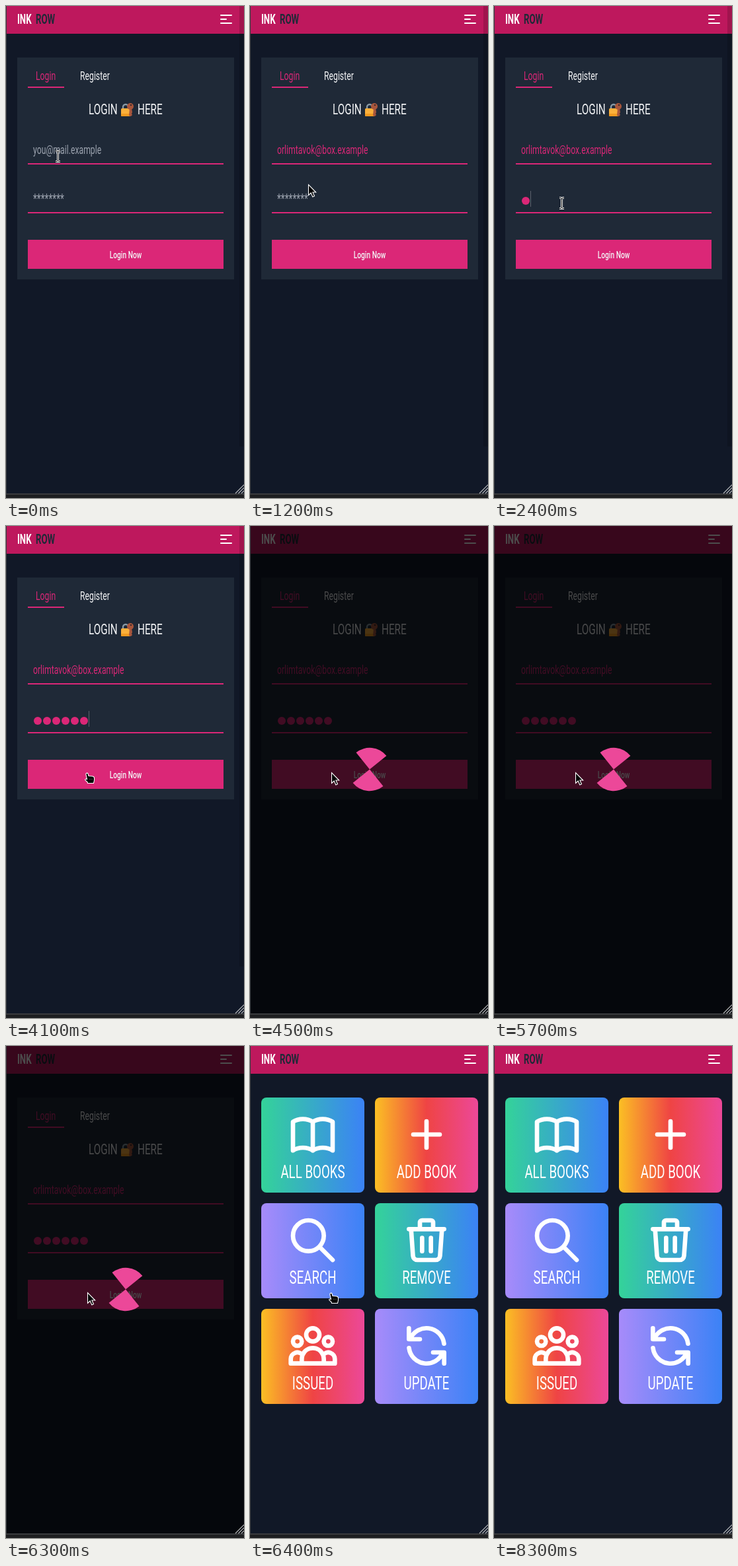
An HTML page that plays this animation: 360 by 745 pixels, repeating every 8.5 s.

```html
<!DOCTYPE html>
<html lang="en">
<head>
<meta charset="utf-8">
<title>Library login</title>
<style>
  html, body { margin: 0; width: 100%; height: 100%; overflow: hidden; background: #111827; }
  svg { display: block; width: 360px; height: 745px; }
  text { font-family: Roboto, "Liberation Sans", sans-serif; white-space: pre; }
  .icon { fill: none; stroke: #fff; stroke-width: 2; stroke-linecap: round; stroke-linejoin: round; }
</style>
</head>
<body>
<svg id="stage" viewBox="0 0 360 745"></svg>
<script>
const LOOP = 8500, STEP = 100;
const CONDENSE = 0.68; // one narrow proportion for the whole typeface
const PINK = '#db2777', PALE = '#f3f4f6', GREY = '#9ca3af', SLATE = '#1f2937';

const rect = (x, y, w, h, fill, extra = '') =>
  `<rect x="${x}" y="${y}" width="${w}" height="${h}" fill="${fill}" ${extra}/>`;
const text = (x, y, size, fill, str, extra = '') =>
  `<text transform="translate(${x} ${y}) scale(${CONDENSE} 1)" font-size="${size}" fill="${fill}" ${extra}>${str}</text>`;
const group = (id, body) => `<g id="${id}">${body}</g>`;
const icon = (x, y, scale, d) =>
  `<path class="icon" transform="translate(${x} ${y}) scale(${scale})" d="${d}"/>`;
const gradient = (id, ...colors) => `<linearGradient id="${id}">${colors.map((c, i) =>
  `<stop offset="${i / (colors.length - 1)}" stop-color="${c}"/>`).join('')}</linearGradient>`;

const tiles = [
  ['ALL BOOKS', 'sea', 'M12 6.25v13m0-13C10.83 5.48 9.25 5 7.5 5S4.17 5.48 3 6.25v13C4.17 18.48 5.75 18 7.5 18s3.33.48 4.5 1.25m0-13C13.17 5.48 14.75 5 16.5 5s3.33.48 4.5 1.25v13C19.83 18.48 18.25 18 16.5 18s-3.33.48-4.5 1.25'],
  ['ADD BOOK', 'fire', 'M12 6v12M6 12h12'],
  ['SEARCH', 'dusk', 'M21 21l-6-6m2-5a7 7 0 11-14 0 7 7 0 0114 0z'],
  ['REMOVE', 'sea', 'M19 7l-.87 12.14A2 2 0 0116.14 21H7.86a2 2 0 01-2-1.86L5 7m5 4v6m4-6v6m1-10V4a1 1 0 00-1-1h-4a1 1 0 00-1 1v3M4 7h16'],
  ['ISSUED', 'fire', 'M17 20h5v-2a3 3 0 00-5.36-1.86M17 20H7m10 0v-2c0-.66-.13-1.28-.36-1.86M7 20H2v-2a3 3 0 015.36-1.86M7 20v-2c0-.66.13-1.28.36-1.86a5 5 0 019.28 0M15 7a3 3 0 11-6 0 3 3 0 016 0zm6 3a2 2 0 11-4 0 2 2 0 014 0zM7 10a2 2 0 11-4 0 2 2 0 014 0z'],
  ['UPDATE', 'dusk', 'M4 4v5h.58m15.36 2A8 8 0 004.58 9H9m11 11v-5h-.58a8 8 0 01-15.36-2m15.36 2H15'],
];
const tile = ([label, fill, d], i) => {
  const x = 17 + 172 * (i % 2), y = 78 + 160 * (i >> 1);
  return rect(x, y, 156, 144, `url(#${fill})`, 'rx="8"') +
    icon(x + 38, y + 16, 10 / 3, d) +
    text(x + 78, y + 122, 27.5, '#fff', label, 'text-anchor="middle"');
};

const padlock = `
  <path d="M177 157v-4a4 4 0 0 1 8 0v4" fill="none" stroke="#8a9aa5" stroke-width="2.4"/>
  ${rect(174, 155, 14, 12, '#fbb03b', 'rx="1.5"')}${rect(174, 163, 14, 4, '#f29a1f', 'rx="1.5"')}
  <circle cx="188" cy="152" r="5" fill="#a8563c"/><circle cx="189" cy="150" r="1.3" fill="#402a2c"/>
  <path d="M187 155l-1 11 3 1 2-2-1-2 1-2-1-6z" fill="#a8563c"/>`;

const login =
  rect(17, 78, 328, 336, SLATE) +
  text(45, 112, 18, PINK, 'Login') + text(112, 112, 18, PALE, 'Register') + rect(33, 122, 55, 2, PINK) +
  text(125, 164, 22.5, PALE, 'LOGIN') + padlock + text(199, 164, 22.5, PALE, 'HERE') +
  rect(33, 238, 296, 2, PINK) + rect(33, 312, 296, 2, PINK) +
  group('hint', text(41, 224, 18, GREY, 'you@mail.example')) +
  group('email', text(41, 224, 18, PINK, 'orlimtavok@box.example')) +
  group('stars', text(41, 299, 20, GREY, '********')) +
  group('dots', [0, 1, 2, 3, 4, 5].map(i => `<circle cx="${48 + 14 * i}" cy="295" r="6" fill="${PINK}"/>`).join('')) +
  rect(0, 0, 1, 24, '#5d626d', 'id="caret"') +
  rect(33, 354, 296, 44, PINK) +
  text(181, 382, 15, PALE, 'Login Now', 'text-anchor="middle" font-weight="500"') +
  rect(353, 0, 7, 667, '#000', 'opacity=".16" id="thumb"');

const header =
  rect(0, 0, 360, 42, '#be185d') +
  text(17, 27, 19.5, '#fff', 'INK', 'font-weight="700"') +
  text(45, 27, 19.5, SLATE, 'ROW', 'font-weight="700"') +
  icon(321, 8, 1, 'M4 6h16M4 12h8m-8 6h16');

// Two opposite quarter wedges around the centre
const wedges = '<path id="wedges" d="M0 0L-20.5 -25.4A32.6 32.6 0 0 1 25.4 -20.5L-25.4 20.5A32.6 32.6 0 0 0 20.5 25.4Z" fill="#ec4899"/>';

const frame =
  rect(0, 0, 1, 745, '#35383d') + rect(0, 738, 360, 7, '#1d1e20') + rect(0, 738, 360, 2, '#3a3b3e') +
  '<path d="M347 738l13-13M351.5 738l8.5-8.5M356 738l4-4" stroke="#b4b6b9" stroke-width="1.2"/>';

const beam = 'M-3-7.5h2l1.5 1 1.500-1h2M.5-6.500v14M-3 8.500h2l1.500-1 1.500 1h2';
const cursors =
  group('beam', `<path d="${beam}" fill="none" stroke="#fff" stroke-width="3"/><path d="${beam}" fill="none" stroke="#000"/>`) +
  group('arrow', '<path d="M.5.5V16.5l3.7-3.5 2.6 6 2.7-1.2-2.6-5.8h4.8z" fill="#000" stroke="#fff" stroke-width="1.1"/>') +
  group('hand', '<path d="M-4.5-6.500q1.500-1 2.500.5l1 3.500 6 .5q2.500.4 2.500 2.800V4L6.500 8.500H-2.500L-3 6.500-6 4q-.8-2 1.300-2l1.200.4L-5-4.500q-.3-1.300.5-2z" fill="#000" stroke="#fff" stroke-width="1.100"/><path d="M.5 1.500v2M2.500 1.500v2M4.500 1.500v2" stroke="#777" stroke-width=".6"/>');

document.getElementById('stage').innerHTML =
  '<defs>' + gradient('sea', '#34d399', '#3b82f6') + gradient('fire', '#fbbf24', '#ef4444', '#ec4899') +
  gradient('dusk', '#a78bfa', '#3b82f6') + '</defs>' +
  rect(0, 0, 360, 745, '#111827') + header + group('login', login) + group('home', tiles.map(tile).join('')) +
  group('loading', rect(0, 0, 360, 738, '#000', 'opacity=".7"') + wedges) + frame + cursors;

const $ = id => document.getElementById(id);
const show = (id, on) => $(id).setAttribute('display', on ? 'inline' : 'none');
const place = (id, x, y, turn = 0) => $(id).setAttribute('transform', `translate(${x} ${y}) rotate(${turn})`);
const lastAt = (list, t) => list.filter(([at]) => at <= t).pop();

const pointer = [
  [0, 'beam', 78, 227], [100, 'beam', 78, 225], [200, 'beam', 78, 224],
  [1000, 'beam', 79, 228], [1100, 'arrow', 82, 246], [1200, 'arrow', 88, 270],
  [1300, 'arrow', 95, 292], [1400, 'arrow', 100, 308], [1500, 'arrow', 102, 315],
  [1700, 'beam', 106, 308], [1800, 'beam', 104, 301], [1900, 'beam', 103, 298], [2100, 'beam', 102, 298],
  [3900, 'arrow', 106, 318], [4000, 'hand', 120, 368], [4100, 'hand', 126, 381],
  [4500, 'arrow', 123, 373], [6400, 'hand', 126, 381], [7600, 'arrow', 0, 211], [7700, 'none'],
  [8000, 'arrow', 28, 5], [8100, 'arrow', 23, 3], [8200, 'arrow', 18, 0], [8300, 'none'],
];
const keyTimes = [2400, 2600, 2900, 3200, 3400, 3700];

function draw(now) {
  const t = Math.floor(now % LOOP / STEP) * STEP;
  const loading = t >= 4500 && t < 6400, home = t >= 6400;
  const filled = t >= 1200, typed = keyTimes.filter(at => at <= t).length;

  show('login', !home);
  show('home', home);
  show('loading', loading);
  show('thumb', t < 4500);
  show('hint', !filled);
  show('email', filled);
  show('stars', !typed);
  [...$('dots').children].forEach((dot, i) => dot.setAttribute('display', i < typed ? 'inline' : 'none'));

  const inEmail = t >= 400 && t < 1200;
  show('caret', inEmail || t >= 2100 && t < 4500);
  place('caret', 41 + 14 * typed, inEmail ? 206 : 280);
  place('wedges', 181, 368.5, (t - 4500) * 0.3);

  const [, kind, x, y] = lastAt(pointer, t);
  for (const id of ['beam', 'arrow', 'hand']) show(id, id === kind);
  if (kind !== 'none') place(kind, x, y);
  requestAnimationFrame(() => draw(performance.now()));
}
draw(0);
</script>
</body>
</html>
```
